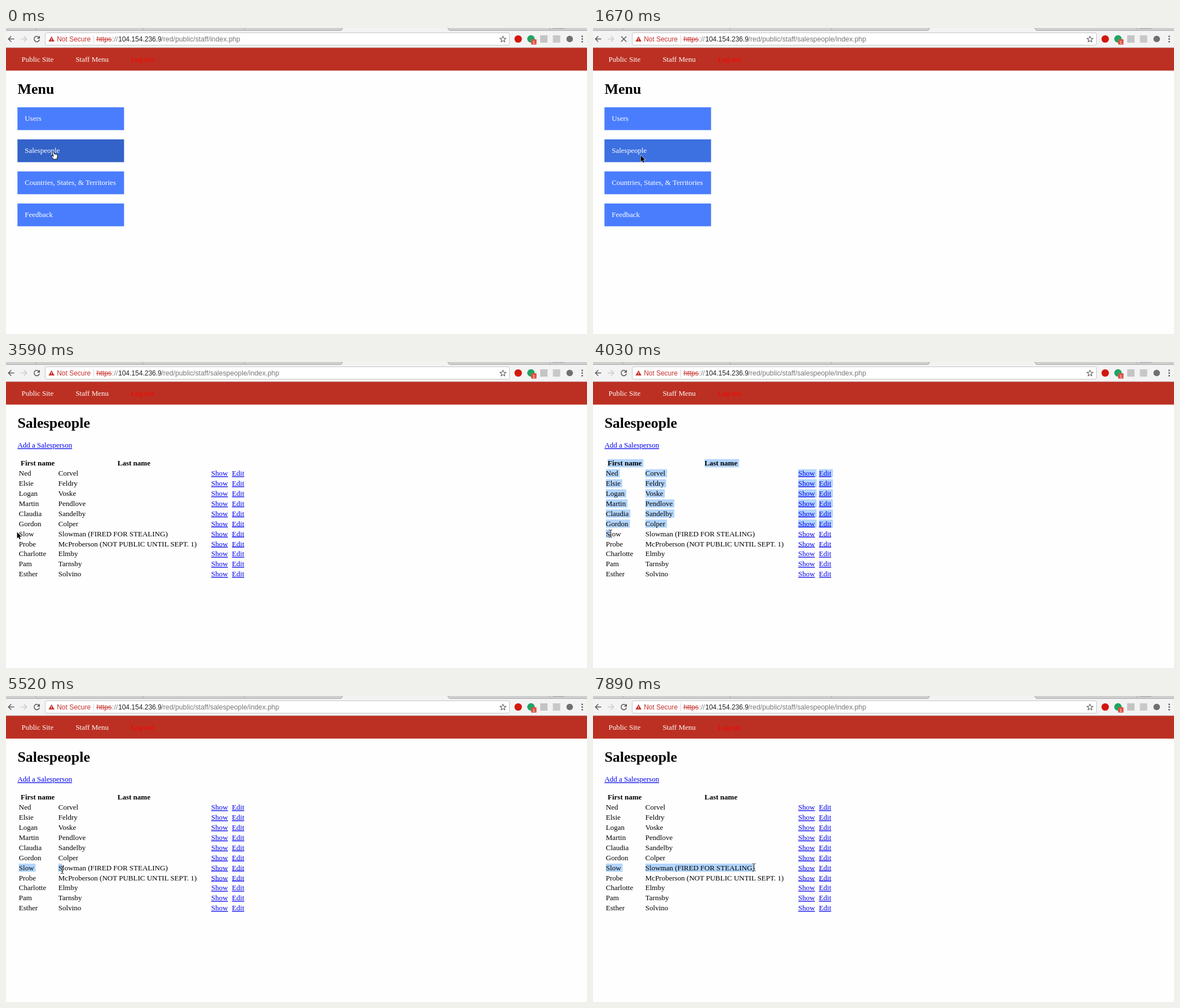
These frames come from a looping animation (1030x544 px, 8 s). An HTML page:

```html
<!DOCTYPE html>
<html lang="en">
<head>
<meta charset="utf-8">
<title>Salespeople</title>
<style>
  html, body { margin: 0; width: 100%; height: 100%; overflow: hidden; background: #fefefe; }
  svg { display: block; width: 100%; height: 100%; }
  text { white-space: pre; }
  .page { font: 13px "Liberation Serif", serif; }
  .page .title { font-size: 26px; font-weight: bold; }
  .page .head { font-weight: bold; }
  .page .link { fill: #00e; text-decoration: underline; }
  .page .light { fill: #fff; }
  .bar { font: 12px "Liberation Sans", sans-serif; }
  .line { fill: none; stroke: #5a5a5a; stroke-width: 1.5; }
</style>
</head>
<body>
<svg viewBox="0 0 1030 544" xmlns="http://www.w3.org/2000/svg">
  <!-- browser bar -->
  <g class="bar">
    <rect width="1030" height="35" fill="#f3f3f3"/>
    <rect width="1030" height="4.5" fill="#cfcfcf"/>
    <path d="M0 4.5H594L597 0M783 0L786 4.5H1030M52 0l3 4.5M242 0l2 4.5M422 0l2 4.5M963 0l3 4.5" fill="none" stroke="#aaa"/>
    <path d="M594.5 5L598 0H782L785.5 5Z" fill="#f3f3f3"/>
    <rect x="969" width="21" height="1.5" fill="#aab0b8"/>
    <path d="M0 34.7H1030" stroke="#c9c4c4" stroke-width=".8"/>
    <rect x="69.5" y="8.5" width="823" height="22" rx="2.5" fill="#fff" stroke="#c6c6c6"/>

    <path class="line" d="M14.5 19.5H4.5M9.3 14.5L4.3 19.5L9.3 24.5"/>
    <path class="line" d="M26.5 19.5H36.5M31.7 14.5L36.7 19.5L31.7 24.5" style="stroke:#cbcbcb"/>
    <g id="reload">
      <path class="line" d="M58.2 16.4A4.8 4.8 0 1 0 59.3 20.8"/>
      <path d="M60 13.8V19H54.8Z" fill="#5a5a5a"/>
    </g>
    <path id="stop" class="line" d="M50 15L59.2 24.2M59.2 15L50 24.2"/>

    <path d="M80.7 14.8L86 24H75.4Z" fill="#c5302a"/>
    <path d="M80.7 18V21M80.7 21.8V23" stroke="#fff"/>
    <text x="90.2" y="24.2" fill="#c5302a">Not Secure</text>
    <path d="M155.5 13V27" stroke="#d4d4d4"/>
    <g font-size="12.3">
      <text x="160.5" y="24.2" fill="#c5302a">https</text>
      <path d="M160 20.5H187.5" stroke="#c5302a"/>
      <text x="188" y="24.2" fill="#808080">://</text>
      <text x="199" y="24.2" font-size="12" fill="#222">104.154.236.9</text>
      <text id="path" x="275.3" y="24.2" fill="#777"></text>
    </g>
    <path d="M881 14.6L882.5 18.1L886.3 18.4L883.4 20.9L884.3 24.6L881 22.6L877.7 24.6L878.6 20.9L875.7 18.4L879.5 18.1Z" fill="none" stroke="#5a5a5a" stroke-width="1.1"/>

    <circle cx="908" cy="19.5" r="6.6" fill="#d3170f"/>
    <circle cx="930.7" cy="19.3" r="6.6" fill="#1fa463"/>
    <rect x="931" y="20" width="9.5" height="9.5" rx="1" fill="#dd5144"/>
    <text x="933.6" y="28" font-size="8" fill="#fff">1</text>
    <rect x="947" y="13" width="13" height="13" fill="#c4c4c4"/>
    <rect x="969.5" y="13" width="13" height="13" fill="#c8c8c8"/>
    <circle cx="999.3" cy="19.5" r="5.8" fill="#707070"/>
    <g fill="#5a5a5a">
      <circle cx="1021.5" cy="15" r="1.4"/><circle cx="1021.5" cy="19.7" r="1.4"/><circle cx="1021.5" cy="24.4" r="1.4"/>
    </g>
  </g>

  <g class="page">
    <rect y="35.2" width="1030" height="40.5" fill="#bb3022"/>
    <text class="light" x="27.5" y="60.3">Public Site</text>
    <text class="light" x="123.4" y="60.3">Staff Menu</text>
    <text x="221.4" y="60.3" fill="#f00">Log out</text>
    <g id="menu"><text class="title" x="20.4" y="116.6">Menu</text></g>
    <g id="list">
      <text class="title" x="20.4" y="116.6">Salespeople</text>
      <text class="link" x="20.4" y="152.4">Add a Salesperson</text>
      <g id="marks" fill="#b3d5fd"></g>
    </g>
  </g>

  <!-- pointers, hot spot at 0,0 -->
  <g id="pointer" stroke-linejoin="round" stroke-linecap="round">
    <path id="hand" fill="#fff" stroke="#111" stroke-width="1"
      d="M-2.6 .6Q-1.6 -1 -.5 .5L1 4.4Q1.6 3.2 2.9 4.5Q3.8 3.7 4.7 5Q6 4.6 6.2 6.2V9L5 13.2H-1L-4.3 8.6Q-4.6 6.9 -2.8 7.4L-1.2 8.3Z"/>
    <path id="arrow" fill="#000" stroke="#fff" stroke-width="1" paint-order="stroke"
      d="M.6 .5V11.6L3.2 9.2L4.9 13.2L6.8 12.4L5.1 8.5H8.5Z"/>
    <g id="beam" fill="none">
      <path stroke="#fff" stroke-width="2.4" stroke-opacity=".7" d="M0 -5.5V5.5"/>
      <path stroke="#222" stroke-width="1" d="M-2.5 -6.5Q0 -6.5 0 -5Q0 -6.5 2.5 -6.5M0 -5V5M-2.5 6.5Q0 6.5 0 5Q0 6.5 2.5 6.5M-1.3 2.5H1.3"/>
    </g>
  </g>
</svg>

<script>
const LOOP = 8000, START = 330, STEP = 148.2;
const CLICK = 330, NEW_URL = 480, HAND_END = 1220, UNHOVER = 1664, LOADED = 1812;
const STRAY_FROM = 3735, STRAY_TO = 4476, DRAG = 4922;
const ROW = 17.9, FIRED = 7;

const people = [
  ['Ned', 'Corvel'], ['Elsie', 'Feldry'], ['Logan', 'Voske'], ['Martin', 'Pendlove'],
  ['Claudia', 'Sandelby'], ['Gordon', 'Colper'], ['Slow', 'Slowman (FIRED FOR STEALING)'],
  ['Probe', 'McProberson (NOT PUBLIC UNTIL SEPT. 1)'], ['Charlotte', 'Elmby'],
  ['Pam', 'Tarnsby'], ['Esther', 'Solvino']
];

// pointer way points: time, x, y
const route = [
  [0, 85, 220], [1080, 85, 220], [1220, 84, 222], [1370, 84, 226], [1670, 84, 226],
  [2400, 64, 298], [2700, 31, 302], [2850, 24, 306], [2990, 18, 306], [3140, 17, 302],
  [3440, 17, 302], [3590, 19, 302], [3740, 23, 304], [4030, 31, 305], [4330, 31, 305],
  [4480, 32, 304.6], [4630, 24, 305], [4780, 24, 305], [5810, 130, 311], [5960, 130, 311],
  [6260, 162, 312.5], [6410, 178, 314], [6550, 195, 314], [6700, 212, 309],
  [7150, 268, 305], [7300, 274, 305], [7890, 285.5, 304.4], [8000, 285.5, 304.4]
];

const el = id => document.getElementById(id);
function add(parent, tag, attrs, text = '') {
  const node = document.createElementNS('http://www.w3.org/2000/svg', tag);
  for (const key in attrs) node.setAttribute(key, attrs[key]);
  node.textContent = text;
  return parent.appendChild(node);
}
const show = (node, on) => node.style.display = on ? '' : 'none';

const buttons = ['Users', 'Salespeople', 'Countries, States, & Territories', 'Feedback'].map((label, i) => {
  const y = 141 + 57 * i;
  const box = add(el('menu'), 'rect', { x: 20.3, y, width: 189, height: 40.5, fill: '#4a7dfd' });
  add(el('menu'), 'text', { x: 33.2, y: y + 24.3, class: 'light' }, label);
  return box;
});

const cells = [];
function addCell(row, x, text, type = '') {
  const y = 184.3 + ROW * row;
  const label = add(el('list'), 'text', { x, y, class: type }, text);
  const mark = add(el('marks'), 'rect', { x, y: y - 11.6, width: 0, height: 14.5 });
  cells.push({ row, x, mark, full: label.getComputedTextLength() + 3 });
}
addCell(0, 26, 'First name', 'head');
addCell(0, 197.8, 'Last name', 'head');
people.forEach(([first, last], i) => {
  addCell(i + 1, 22.8, first);
  addCell(i + 1, 92.8, last);
  addCell(i + 1, 363.8, 'Show', 'link');
  addCell(i + 1, 400.6, 'Edit', 'link');
});

function pointerAt(t) {
  const i = Math.max(1, route.findIndex(p => p[0] > t));
  const [t0, x0, y0] = route[i - 1], [t1, x1, y1] = route[i];
  const k = (t - t0) / (t1 - t0);
  return [x0 + (x1 - x0) * k, y0 + (y1 - y0) * k];
}

function markedWidth(cell, t, x, below) {
  const upToPointer = Math.max(0, Math.min(cell.full, x - cell.x));
  const stray = t >= STRAY_FROM && t < STRAY_TO;
  if (!stray && t < DRAG) return 0;
  if (cell.row < FIRED) return stray ? cell.full : 0;
  if (cell.row === FIRED) return below ? cell.full : upToPointer;
  return below && cell.row === FIRED + 1 && cell.x < 50 ? cell.full : 0;
}

function draw(time) {
  const t = time < START ? 0 : START + STEP * Math.floor((time - START + 6) / STEP);
  const [x, y] = pointerAt(t);
  const loaded = t >= LOADED, below = y > 313;
  const kind = t < HAND_END - 6 ? 'hand' : t < STRAY_FROM || below ? 'arrow' : 'beam';

  show(el('menu'), !loaded);
  show(el('list'), loaded);
  show(el('stop'), t >= CLICK && !loaded);
  show(el('reload'), t < CLICK || loaded);
  el('path').textContent = `/red/public/staff/${t >= NEW_URL - 6 ? 'salespeople/' : ''}index.php`;
  buttons[1].setAttribute('fill', t < UNHOVER - 6 ? '#3363c8' : '#3d70e1');

  for (const name of ['hand', 'arrow', 'beam']) show(el(name), name === kind);
  el('pointer').setAttribute('transform', `translate(${x} ${y})`);
  for (const cell of cells) cell.mark.setAttribute('width', markedWidth(cell, t, x, below));
}

function tick() {
  draw(performance.now() % LOOP);
  requestAnimationFrame(tick);
}
tick();
</script>
</body>
</html>
```
